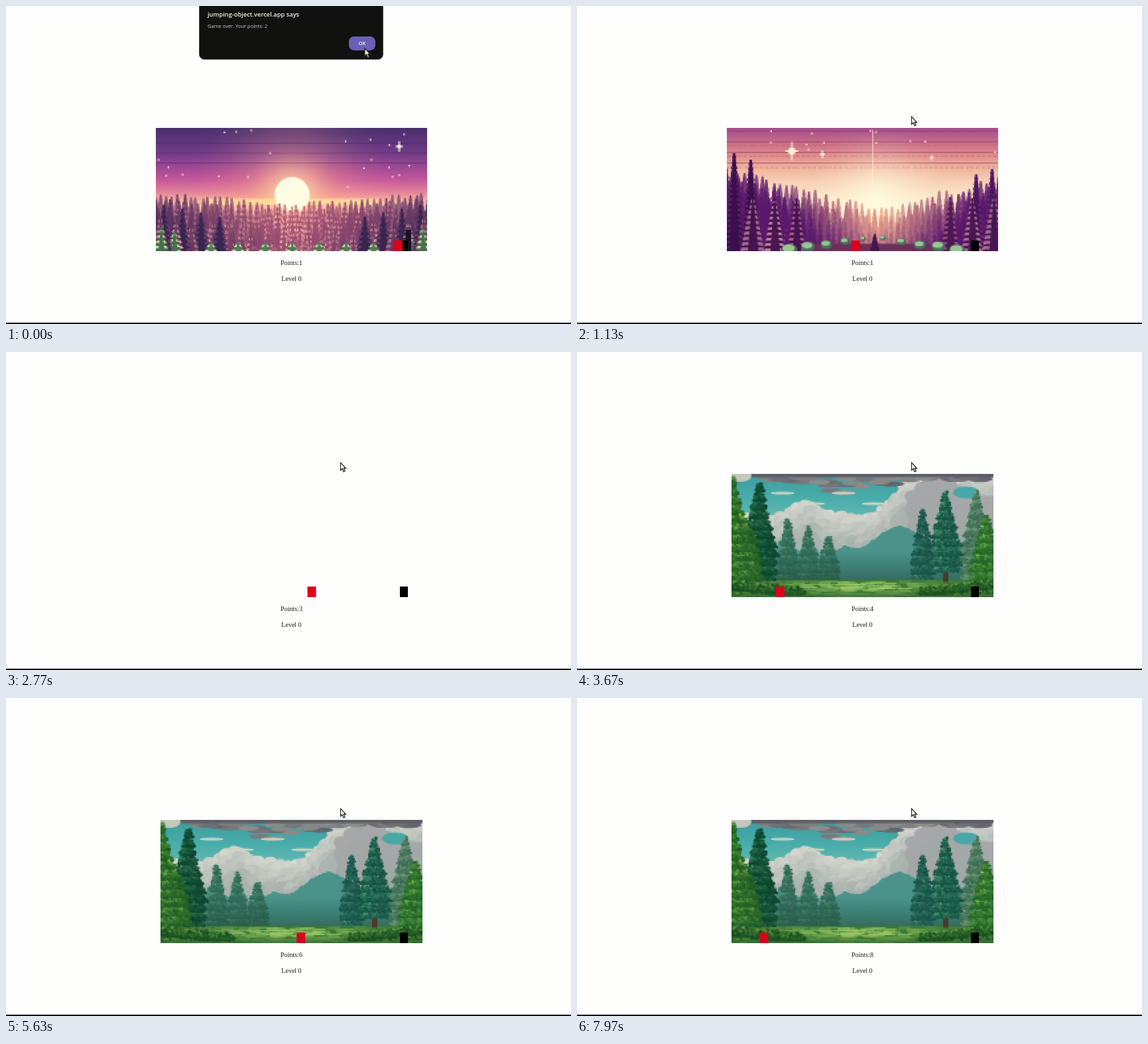
Write an HTML page with a canvas that moves like this. It is 852x480 px and loops after 8000 ms.

```html
<!DOCTYPE html>
<html lang="en">
<head>
<meta charset="utf-8">
<title>Jumping object</title>
<style>
  html, body { margin: 0; width: 100%; height: 100%; overflow: hidden; background: #fefefd; }
  #stage { position: relative; width: 852px; height: 480px; overflow: hidden; }
  #stage > * { position: absolute; }
  canvas { image-rendering: pixelated; top: 184px; }
  .block { left: 0; top: 354px; width: 12.5px; height: 15.5px; }
  #player { left: 593.7px; background: #000; }
  #obstacle { background: #d8041c; }
  .label { left: 330.5px; width: 200px; text-align: center; font: 10px/12px "Liberation Serif", serif; color: #1a1a1a; }
  #floor { left: 0; top: 478px; width: 852px; height: 2px; background: #000; }
  #alert { left: 291px; top: -12px; width: 276px; height: 91px; border: 1px solid #4a4a40; border-radius: 8px;
    background: #11110f; color: #f4f4ea; font-family: "Open Sans", sans-serif; }
  #alert * { position: absolute; white-space: nowrap; }
  #alert b { left: 12px; top: 17px; font-size: 9.3px; line-height: 13px; font-weight: 600; }
  #alert p { margin: 0; left: 12px; top: 36px; font-size: 7.5px; line-height: 11px; color: #d0d0c8; }
  #alert i { left: 225px; top: 57px; width: 40px; height: 21px; border-radius: 8px; background: #6b5fb8;
    font: 600 7.8px/21px "Open Sans", sans-serif; text-align: center; }
  #cursor { left: 0; top: 0; }
</style>
</head>
<body>
<div id="stage">
  <canvas id="dusk"></canvas>
  <canvas id="sunset"></canvas>
  <canvas id="meadow"></canvas>
  <div id="player" class="block"></div>
  <div id="obstacle" class="block"></div>
  <div id="points" class="label" style="top:382px">Points:1</div>
  <div class="label" style="top:406px">Level 0</div>
  <div id="floor"></div>
  <div id="alert"><b>jumping-object.vercel.app says</b><p>Game over. Your points: 2</p><i>OK</i></div>
  <svg id="cursor" width="12" height="18" viewBox="-1 -1 12 18">
    <path d="M0 0V11.5L2.6 9.2L4.6 13.8L6.6 12.8L4.7 8.5H8Z" fill="#fff" stroke="#2a2a24" stroke-width="1.3"/>
  </svg>
</div>
<script>
const $ = id => document.getElementById(id);
const clamp = v => Math.min(1, Math.max(0, v));
const smooth = v => { const k = clamp(v); return k * k * (3 - 2 * k); };

// ---------- painting helpers, all in stage coordinates ----------
let c, rnd;
const TOP = 184, BOTTOM = 370;

function scene(id, left, width, paint) {
  const el = $(id);
  let seed = id.length * 7919 + 11;
  rnd = () => (seed = (seed * 16807) % 2147483647) / 2147483647;
  c = el.getContext('2d');
  el.width = Math.ceil(width / 2);
  el.height = 93;
  Object.assign(el.style, { left: left + 'px', width: width + 'px', height: '186px' });
  c.setTransform(.5, 0, 0, .5, -left / 2, -TOP / 2);
  paint(left, left + width);
}

function rect(color, x, y, w, h) {
  c.fillStyle = color;
  c.fillRect(x, y, w, h);
}

function disc(color, x, y, rx, ry = rx) {
  c.fillStyle = color;
  c.beginPath();
  c.ellipse(x, y, rx, ry, 0, 0, 7);
  c.fill();
}

// Blend of two hex colours
function mix(a, b, k) {
  const part = (s, i) => parseInt(s.slice(i, i + 2), 16);
  return `rgb(${[1, 3, 5].map(i => Math.round(part(a, i) + (part(b, i) - part(a, i)) * clamp(k)))})`;
}

function fade(colors, y0, y1) {
  const g = c.createLinearGradient(0, y0, 0, y1);
  colors.forEach((color, i) => g.addColorStop(i / (colors.length - 1), color));
  rect(g, 220, y0, 420, Math.max(y1, BOTTOM) - y0);
}

function glow(x, y, r, color) {
  const g = c.createRadialGradient(x, y, 0, x, y, r);
  for (let k = 0; k <= 1; k += .125) {
    const alpha = Math.round((1 - k) ** 2 * 255).toString(16).padStart(2, '0');
    g.addColorStop(k, color + alpha);
  }
  rect(g, 220, TOP, 420, 186);
}

function stars(color, n, depth) {
  for (let i = 0; i < n; i++) rect(color, 228 + rnd() * 404, 186 + rnd() * depth, 2.5, 2.5);
}

function sparkle(color, x, y, r) {
  rect(color, x - 1, y - r, 2, 2 * r);
  rect(color, x - r * .7, y - 1, r * 1.4, 2);
  disc(color, x, y, r * .4);
}

// Faint scan bands across the sky
function bands(color, from, to, gap) {
  for (let y = from; y < to; y += gap) rect(color, 220, y, 420, 2);
}

// Fir tree of two-pixel rows; light catches the branch tips
function fir(x, top, base, w, dark, light) {
  for (let y = top; y < base; y += 2) {
    const saw = ((y - top) % 8) / 8, grow = Math.min(1, .06 + (y - top) / (base - top));
    const half = 1 + w / 2 * grow * (.7 + .3 * saw);
    rect(dark, x - half, y, half * 2, 2);
    if (light && saw >= .5) {
      rect(light, x - half, y, half * .6, 2);
      rect(light, x + half * .5, y, half * .45, 2);
    }
  }
}

// Leafy cone of clumps, painted from the base up
function leafy(x, top, base, w, dark, light, clump = 3) {
  for (let y = base; y > top; y -= clump * .8) {
    const grow = (y - top) / (base - top), tier = (y - top) % 14 / 14;
    const half = w / 2 * Math.min(1, .08 + grow * 1.3) * (.75 + .25 * tier);
    for (let dx = -half; dx <= half; dx += clump) {
      const lit = rnd() * (.75 - dx / half * .3) * (1.1 - tier);
      disc(mix(dark, light, lit), x + dx + rnd() * 3 - 1.5, y + rnd() * 2, clump * (.6 + rnd() * .5), clump * .7);
    }
  }
}

// Heap of puffs whose upper edge follows a profile
function cumulus(x0, x1, profile, light, shade) {
  for (let depth = 0; depth < 90; depth += 7)
    for (let x = x0; x < x1; x += 7) {
      const r = 5 + rnd() * 5;
      disc(mix(light, shade, depth / 60 + rnd() * .4), x + rnd() * 7, profile(x) + depth + rnd() * 6, r * 1.2, r);
    }
}

// ---------- the three backgrounds ----------
scene('dusk', 226, 409, (left, right) => {
  const sun = 432;
  fade(['#49306c', '#5c357a', '#743c88', '#9c4793', '#c4589a', '#e58798', '#ffd2a4'], TOP, 302);
  glow(sun, 288, 170, '#ffa48c');
  bands('rgba(50,28,80,.25)', 206, 250, 15);
  stars('#ffd9d0', 22, 92);
  sparkle('#ffeedd', 594, 212, 8);
  rect('rgba(255,228,150,.75)', sun - 130, 291, 260, 9);
  glow(sun, 286, 80, '#ffe6aa');
  disc('#fffce4', sun, 285, 27);

  // Rows of firs, warm under the sun and purple at the sides
  for (let row = 0; row < 8; row++)
    for (let x = left - 4 + row % 2 * 5; x < right + 6; x += 9 + row) {
      const away = Math.abs(x - sun) / 190;
      const top = 297 + row * 9 - away * (row < 2 ? 16 : 6) + rnd() * 7;
      const light = rnd() < .65 - away * .4 && mix('#ffd0a4', '#b86090', away);
      fir(x + rnd() * 4, top, top + 38, 14 + row, mix('#bc5c7c', '#50305f', away * .8 + row * .05), light);
    }
  for (const side of [-1, 1])
    for (let i = 0; i < 4; i++) {
      fir(sun + side * (110 + i * 28), 318 - i * 6, BOTTOM, 26, '#38264f', '#633a66');
      fir(sun + side * (130 + i * 23), 340 - i * 7, 372, 26, '#6c3b60', '#d9a0a4');
      fir(sun + side * i * 41, 356, 376, 28, '#547a58', '#c9e69c');
      if (i > 1) fir(sun + side * (138 + i * 20), 352 - i * 6, 376, 24, '#486d50', '#b7dc8c');
    }
  rect('#1c1222', 603, 338, 9, 32);
});

scene('sunset', 226, 409, (left, right) => {
  const gap = 455;
  fade(['#a24c8c', '#c46a88', '#df8a88', '#efb49c', '#f6d0b4', '#fbe2c4', '#fff0cc'], TOP, 305);
  bands('rgba(130,50,110,.4)', 188, 240, 16);
  for (let y = 209; y < 250; y += 17)
    for (let x = left; x < right; x += 8) rect('rgba(190,95,120,.45)', x + rnd() * 3, y, 5, 2);
  rect('rgba(255,232,190,.55)', 446, 187, 2, 95);
  glow(gap, 296, 125, '#fffbe0');
  stars('#ffe8d8', 12, 40);
  [14, 6, 4].forEach((r, i) => sparkle('#fff0d0', 324 + i * 46 + (i > 1 ? 120 : 0), 219 + i * 5, r));

  // A valley of firs rising towards both sides
  for (let row = 0; row < 6; row++)
    for (let x = left - 4; x < right + 6; x += 9) {
      const away = Math.abs(x - gap) / 205;
      const top = 304 - away * 56 + row * 11 + rnd() * 13;
      const k = away * 1.2 + row * .09;
      fir(x + rnd() * 5, top, top + 58, 19, mix('#eea48c', '#591a6c', k),
        rnd() < .3 && mix('#ffcf9c', '#7c2c7c', k));
    }
  rect('#6b3058', 340, 359, 235, 11);
  for (let i = 0; i < 2; i++) {
    fir(237 + i * 25, 222 + i * 10, 372, 34, '#3a0f4c', '#581c66');
    fir(627 - i * 24, 246 + i * 8, 372, 30, '#4a1660', '#6a2470');
  }
  for (let i = 2; i >= 0; i--)
    for (const x of [265 + i * 33, 630 - i * 33])
      fir(x, 285 + rnd() * 6, 374, 38 - i * 4, '#471650', mix('#e0aeb4', '#a85888', i / 2));

  // Bushes grow larger away from the path
  for (const side of [-1, 1])
    for (let i = 0; i < 5; i++) {
      const x = 447 + side * (15 + i * 28), y = 348 + i * 4.5 + rnd() * 4, r = 5 + i * 1.8;
      disc('#48705f', x, y, r, r * .75);
      disc('#9cc492', x - 1, y - r * .2, r * .75, r * .45);
    }
  fir(450, 344, 372, 16, '#43164c');
});

scene('meadow', 233, 395, (left, right) => {
  const middle = 430;
  fade(['#3c9c9e', '#48acaa', '#66bab2', '#a4c4b8'], TOP, 290);
  const bump = (x, at, width) => Math.exp(-(((x - at) / width) ** 2));
  cumulus(left, right, x => 250 - 20 * bump(x, 345, 32) - 62 * smooth((x - 430) / 90), '#d6d8ce', '#a9b2ae');
  cumulus(505, right, x => 214 - 28 * bump(x, 540, 28) + Math.abs(x - 560) * .15, '#a8a8ac', '#a2a8a6');
  disc('#48a8a6', 588, 212, 20, 9);
  for (let i = 0; i < 70; i++) {
    const x = 268 + rnd() * 360, low = 26 * bump(x, 410, 60) + 9;
    disc(mix('#62646c', '#92928e', rnd()), x, TOP + rnd() * low, 16, 3.5);
  }
  rect('#5c5f64', 262, TOP, 366, 5);
  disc('#c4c8bc', 247, 187, 16, 9);
  for (let i = 0; i < 4; i++) disc('#cfd5c6', 310 + i * 46, 213 + i % 2 * 16, 18, 2);

  // Mountain and the misty woods behind the clearing
  c.fillStyle = '#4b938a';
  c.beginPath();
  for (let x = 375; x < 560; x += 3) c.lineTo(x, 306 - 44 * bump(x, 487, 50) - 12 * bump(x, 404, 16) + rnd() * 3);
  c.lineTo(560, 345);
  c.lineTo(375, 345);
  c.fill();
  for (let row = 0; row < 4; row++)
    for (let x = 285; x < 600; x += 9) {
      const rise = Math.abs(x - middle) / 4.2;
      const top = 304 - rise * .9 + row * 8 + rnd() * 16;
      leafy(x + rnd() * 5, top, 345, 19, mix('#4a8878', '#285648', row / 3), mix('#78ac94', '#4a8468', row / 3), 2.6);
    }
  for (let i = 0; i < 3; i++) leafy(318 + i * 31, 250 + i * 13, 343, 34, '#2c6654', '#5c9a7c');
  fade(['rgba(40,90,76,0)', 'rgba(36,80,62,.6)'], 300, 346);

  // Grass: a bright strip of light in the centre
  rect('#3a7a34', left, 344, 395, 26);
  for (let i = 0; i < 420; i++) {
    const x = left + rnd() * 395, y = 345 + rnd() * 24;
    const sun = bump(x, middle, 125) * bump(y, 353, 10);
    rect(mix('#25602a', '#a4cf6a', sun * .85 + rnd() * .25), x - 9, y, 18, 1.6);
  }

  // Foreground trees frame the clearing
  leafy(604, 208, 342, 50, '#3a6a54', '#80a67c');
  for (const x of [275, 557]) rect('#4c3a2a', x - 4, 315, 8, 32);
  leafy(523, 236, 340, 36, '#155044', '#47907a');
  leafy(557, 210, 330, 50, '#12503f', '#4c9c7a');
  leafy(275, 196, 342, 56, '#0c4430', '#3c8a58', 3.4);
  leafy(236, 188, 290, 40, '#1c5c22', '#78b248', 3.4);
  leafy(250, 244, 340, 60, '#1e5c24', '#8cc452', 3.4);
  leafy(619, 246, 348, 50, '#1e6228', '#84c450', 3.4);
  for (let x = left; x < right + 4; x += 6) {
    const away = Math.abs(x - middle) / 200;
    if (away > .45) leafy(x, 363 - away * 20, 366 - away * 4, 18, '#164a22', '#5c9a3c');
  }
});

// ---------- timeline ----------
const LOOP = 8000, RESTART = 453.75, TICK = 29.36, STEPS = 50, STRIDE = 8.15;
const JUMP = { firstStep: 39, steps: 17, height: 45 };

const place = (el, x, y) => { el.style.transform = `translate(${x}px, ${y}px)`; };
const show = (el, on) => { el.style.visibility = on ? 'visible' : 'hidden'; };

function draw(t) {
  const elapsed = t - RESTART, running = elapsed >= 0;
  const step = running ? Math.floor(elapsed / TICK) : 44;
  place($('obstacle'), 226.4 + step % STEPS * STRIDE, 0);

  const phase = (step - JUMP.firstStep + STEPS) % STEPS / JUMP.steps;
  const airborne = running && step >= JUMP.firstStep && phase < 1;
  place($('player'), 0, airborne ? -JUMP.height * 4 * phase * (1 - phase) : 0);

  $('points').textContent = 'Points:' + (running ? 1 + Math.floor(elapsed / 1000) : 1);
  show($('alert'), !running);
  show($('dusk'), !running);
  show($('sunset'), t >= 880 && t < 2454);
  show($('meadow'), t >= 2900);

  const move = smooth((t - 470) / 350);
  place($('cursor'), 540 - 36.5 * move, 63 + 103 * move);
}

// Time advances in thirtieths of a second, rounded to 10 ms
let start;
function frame(now) {
  start ??= now;
  const t = (now - start) % LOOP;
  draw(Math.round(Math.floor((t + 5) * .03) * 10 / 3) * 10);
  requestAnimationFrame(frame);
}
draw(0);
requestAnimationFrame(frame);
</script>
</body>
</html>
```
